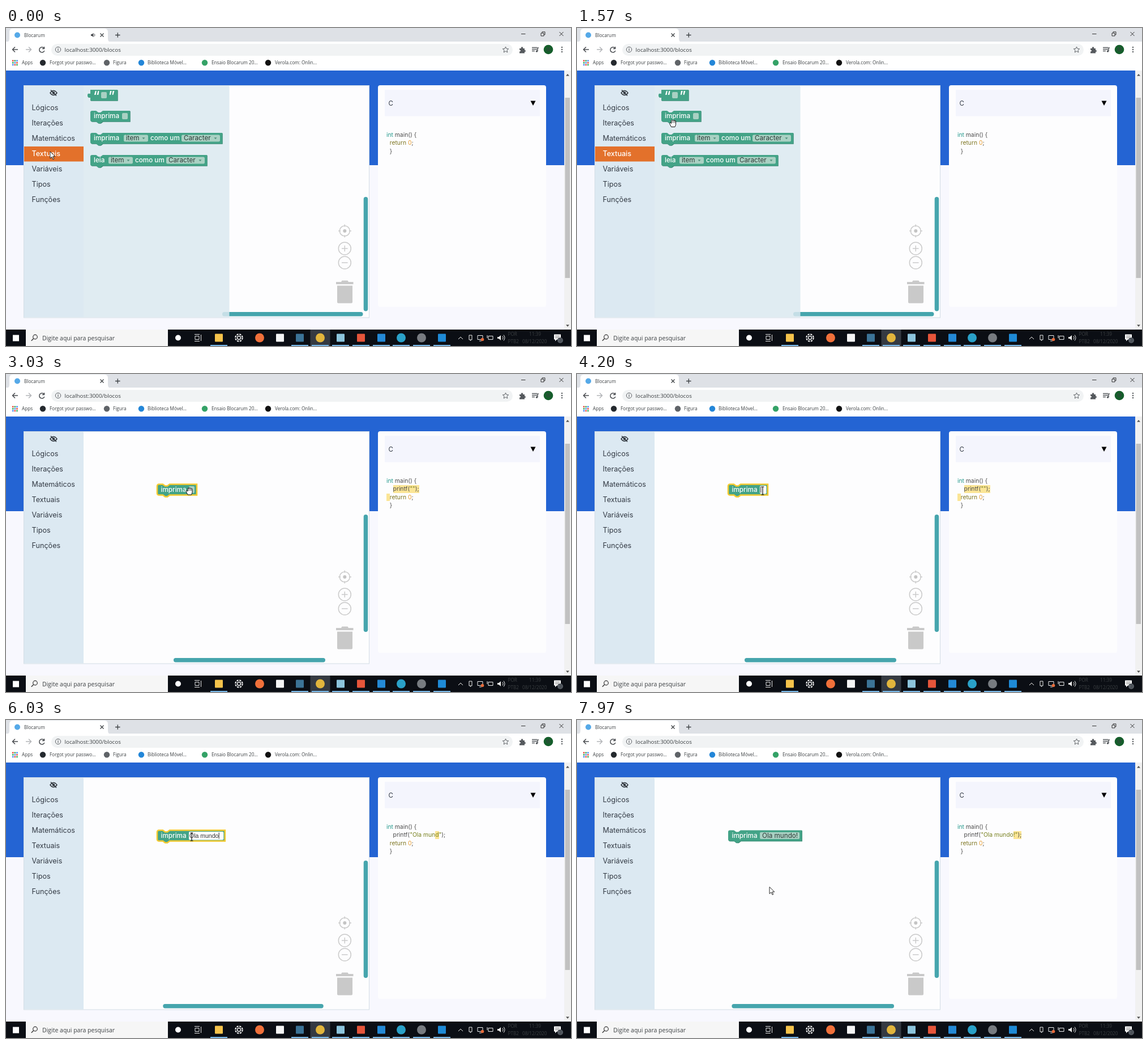
Write an HTML page that moves like this. It is 998 px wide and 561 px high and loops after 8000 ms.

```html
<!DOCTYPE html>
<html lang="pt-BR">
<head>
<meta charset="utf-8">
<title>Blocos</title>
<style>
html, body { margin: 0; width: 100%; height: 100%; overflow: hidden; background: #f8f8fe; }
svg { position: absolute; inset: 0; width: 100%; height: 100%; display: block; }
text { white-space: pre; }
.ui { font-family: "Open Sans", "Noto Sans", sans-serif; fill: #3c4043; }
.page { font-family: Inter, sans-serif; font-size: 12.6px; fill: #333a44; }
.block { font-family: Inter, sans-serif; font-size: 11.7px; font-weight: 500; fill: #fff; }
.value { font-family: Inter, sans-serif; font-size: 11.7px; fill: #303b38; }
.input { font-family: "Liberation Sans", Arial, sans-serif; font-size: 10.5px; fill: #333; }
pre { position: absolute; left: 672px; top: 181px; margin: 0; font: 10.3px/14.4px Inter, sans-serif; color: #4b4b4b; }
pre b { font-weight: 400; }
.type { color: #23988c; } .key { color: #7d7520; } .num { color: #e69a2c; } .str { color: #78801f; }
pre i { font-style: normal; background: #fbe596; display: inline-block; line-height: 13.4px; }
</style>
</head>
<body>
<svg id="stage" viewBox="0 0 998 561"></svg>
<pre id="code"></pre>
<script>
const GREEN = '#43a387', TEAL = '#46a5ad', PILL = '#a9d1c3';
const LOOP = 8000, PHRASE = 'Ola mundo!';
const KEY_TIMES = [4560, 4730, 4890, 5030, 5190, 5420, 5580, 5760, 5960, 6300];
const COMMIT_LAG = 130;
const DRAG = [1780, 2860], EDIT = [3960, 7600];

const rect = (x, y, w, h, fill, r = 0, more = '') =>
  `<rect x="${x}" y="${y}" width="${w}" height="${h}" rx="${r}" fill="${fill}" ${more}/>`;
const dot = (x, y, r, fill, more = '') => `<circle cx="${x}" cy="${y}" r="${r}" fill="${fill}" ${more}/>`;
const line = (d, color, w = 1, more = '') =>
  `<path d="${d}" fill="none" stroke="${color}" stroke-width="${w}" ${more}/>`;
const shape = (d, fill, more = '') => `<path d="${d}" fill="${fill}" ${more}/>`;
const text = (x, y, s, cls, size, more = '') =>
  `<text x="${x}" y="${y}" class="${cls}" ${size ? `style="font-size:${size}px"` : ''} ${more}>${s}</text>`;
const group = (id, body, more = '') => `<g id="${id}" ${more}>${body}</g>`;

const statement = w => `M0,3a3 3 0 0 1 3,-3H10l4,3h4l4,-3H${w}V19H22l-4,3h-4l-4,-3H3a3 3 0 0 1-3,-3z`;
const blockBody = d => shape(d, '#2f8069', 'transform="translate(.7 .7)"') + shape(d, GREEN);
const at = (x, y, body) => `<g transform="translate(${x} ${y})">${body}</g>`;
const dropdown = (x, w, label) => rect(x, 3.5, w, 12, PILL, 2.5) + text(x + 4, 13.2, label, 'value')
  + shape(`M${x + w - 10.5},8.2h5l-2.5,3z`, '#51907d');
const readBlock = (y, verb, x, w) => at(149, y, blockBody(statement(w)) + text(6, 13.3, verb, 'block')
  + dropdown(x, 43, 'item') + text(x + 47, 13.3, 'como um', 'block') + dropdown(x + 102, 68, 'Caracter'));

function browser() {
  const bookmarks = [
    [77, 65, '#24292e', 'Forgot your passwo...'], [189, 178, '#5f6368', 'Figura'],
    [250, 239, '#2386d8', 'Biblioteca Móvel...'], [363, 351, '#34a267', 'Ensaio Blocarum 20...'],
    [475, 463, '#111', 'Verola.com: Onlin...']];
  const appColors = ['#e94335', '#34a853', '#4285f4'];
  let s = rect(0, 0, 998, 25, '#dee1e6') + rect(0, 24, 998, 51, '#fff')
    + shape('M0,25q6,0 6,-6V7q0,-6 6,-6H174q6,0 6,6V19q0,6 6,6z', '#fff')
    + dot(20, 12.5, 5, '#55a9e8') + text(32, 15.5, 'Blocarum', 'ui', 8.2)
    + line('M166.500,9.500l6,6m0,-6l-6,6M193,12.500h8.500m-4.200,-4.200v8.500', '#3c4043', 1.3)
    + line('M910,10.500h7.500M945,9h5v5h-5zM947,8.800v-2h5v5h-2M977.500,7l7,7m0,-7l-7,7', '#333')
    + rect(80, 28, 815, 21, '#f1f3f4', 10.5)
    + line('M21,38h-9.500m4.500,-4.500l-4.500,4.500l4.500,4.500M67,35.500a4.600 4.600 0 1 0 .8,4.500M67.500,33v3.500h-3.500', '#4a4d51', 1.5)
    + line('M35,38h9.500m-4.500,-4.500l4.500,4.500l-4.500,4.500', '#b4b6b9', 1.5)
    + line('M92,40.500v-3.500m0,-2v1.200', '#5f6368', 1.2) + dot(92, 38, 4.7, 'none', 'stroke="#5f6368"')
    + text(103.5, 41.5, 'localhost:3000/blocos', 'ui', 9.8)
    + line('M882.500,33l1.500,3.500 3.700,.3-2.800,2.500 .9,3.700-3.300,-2-3.300,2 .9,-3.700-2.800,-2.500 3.700,-.3z', '#5f6368')
    + shape('M907,36h3q-.5,-2.800 1.500,-2.800t1.500,2.800h3v3q2,0 2,1.500t-2,1.500v2.500h-9v-3q2,0 2,-1.500t-2,-1.500z', '#55595d')
    + line('M929,34.500h9m-9,3h9m-9,3h5M939,41v-6h2', '#55595d', 1.5) + dot(937.5, 41, 1.8, '#55595d')
    + dot(958, 38, 8.3, '#155e2b') + text(958, 41, 'M', 'ui', 8.5, 'text-anchor="middle" fill="#fff" style="fill:#fff;font-size:8.5px"')
    + [34, 38, 42].map(y => dot(982, y, 1.2, '#55595d')).join('');
  for (let i = 0; i < 9; i++) s += rect(11 + i % 3 * 3.6, 56.5 + (i / 3 | 0) * 3.6, 2.5, 2.5, appColors[(i + (i / 3 | 0)) % 3]);
  s += text(28, 64.3, 'Apps', 'ui', 8.2);
  for (const [x, icon, color, label] of bookmarks) s += dot(icon, 61.3, 5.2, color) + text(x, 64.3, label, 'ui', 8.2);
  return s + group('audio', shape('M150,11h2l2.500,-2.300v7.600l-2.500,-2.300h-2z', '#4a4d51')
    + line('M156,10.300q2,2.200 0,4.400', '#4a4d51'));
}

function page() {
  const labels = ['Lógicos', 'Iterações', 'Matemáticos', 'Textuais', 'Variáveis', 'Tipos', 'Funções'];
  return rect(0, 75, 998, 457, '#f8f8fe') + rect(0, 75, 986, 167, '#2464d3')
    + rect(986, 75, 12, 457, '#f1f1f1') + rect(987.5, 123, 8.5, 318, '#c1c1c1')
    + shape('M989,84.500h6l-3,-3.500zM989,523.500h6l-3,3.500z', '#505050')
    + rect(31.5, 101.5, 610, 409.500, '#fdfdfe', 0, 'stroke="#d3dde5"')
    + rect(657, 101, 297, 391, '#fdfdfe', 4) + rect(669, 109, 274, 46.500, '#f4f5fd')
    + text(675.5, 136.5, 'C', 'page', 11.5) + shape('M926.500,128.500h9l-4.500,8.500z', '#000')
    + rect(0, 504.5, 0, 7.5, TEAL, 3.7, 'id="barX" transform="translate(0 -3.500)"')
    + rect(631.700, 0, 7.5, 0, TEAL, 3.7, 'id="barY"')
    + [[358, 9], [389, 11], [414, 11]].map(([y, r]) => dot(598.3, y, r, 'none', 'stroke="#cbcbcb" stroke-width="1.500"')).join('')
    + dot(598.3, 358, 3, '#c4c4c4')
    + line('M598.300,346.500v4m0,15v4M587,358h4m15,0h4M593,389h10.600m-5.300,-5.300v10.600M593,414h10.600', '#cbcbcb', 1.5)
    + shape('M583,448h9l1.500,-2.500h10l1.500,2.500h8.500v4h-30.500zM585,454.500h27v29q0,2 -2,2h-23q-2,0 -2,-2z', '#c9c9c9')
    + rect(32, 102, 105, 408.500, '#dce9f2')
    + rect(32, 209, 105, 26.500, '#e3712b', 0, 'id="selected"')
    + line('M78,114.500q6,-8 12,0q-6,8 -12,0zM79,109.500l10,10', '#30363d', 1.500) + dot(84, 114.500, 2.300, '#30363d')
    + labels.map((s, i) => text(45.5, 145 + i * 27, s, 'page', 0, i === 3 ? 'id="chosen"' : '')).join('');
}

function flyout() {
  const quote = 'M3,0H51V19H3V14c0,-3 -5,2 -5,-4s5,-1 5,-4z';
  return group('flyout', rect(137, 102, 257.500, 408.500, '#dbe9f0', 0, 'opacity=".85"')
    + at(146, 109, blockBody(quote) + rect(22, 4, 10, 11, PILL, 2)
      + text(8, 20, '“', 'block', 24) + text(35, 20, '”', 'block', 24))
    + at(149, 146, blockBody(statement(70)) + text(6, 13.3, 'imprima', 'block') + rect(56, 4, 10, 11, PILL, 2))
    + readBlock(185, 'imprima', 59, 233) + readBlock(224, 'leia', 32, 206));
}

function taskbar() {
  const apps = [[376, '#f5c34b', 1], [448, '#f0703a', 0], [484, '#f4f4f4', 0], [519, '#3c7396', 1], [555, '#e2b53c', 1],
    [591, '#8cc4dc', 1], [627, '#e6553a', 1], [663, '#2489d5', 1], [698, '#2aa1c8', 1], [734, '#777b80', 1], [770, '#1e8ad6', 1]];
  const square = [376, 484, 519, 591, 627, 663, 770];
  let s = rect(0, 532, 998, 29, '#0b0e14') + rect(35, 532, 251, 29, '#f6f6f6')
    + rect(12, 541.5, 11, 11, '#fff') + dot(51.5, 545, 3.8, 'none', 'stroke="#333" stroke-width="1.200"')
    + line('M48.800,547.800l-4,4', '#333', 1.3) + text(64, 550.5, 'Digite aqui para pesquisar', 'ui', 10.5)
    + dot(304, 546.5, 5, '#fff')
    + line('M334,543.500h7v6h-7zM333,540.500h9M333,552.500h9M344.500,541v11', '#e8e8e8')
    + rect(537.5, 532, 35, 29, '#353a42')
    + dot(411.5, 546.5, 6.2, 'none', 'stroke="#eee" stroke-width="2.200" stroke-dasharray="3.200 1.670"')
    + dot(411.5, 546.5, 3, 'none', 'stroke="#eee" stroke-width="1.500"');
  for (const [x, color, open] of apps) {
    s += square.includes(x) ? rect(x - 7, 539.5, 14, 14, color, 1) : dot(x, 546.5, 8, color);
    if (open) s += rect(x - 15, 559, 30, 2, '#77b7e8');
  }
  const tray = (x, y, label) => text(x, y, label, 'ui', 8.2, 'style="fill:#fff;font-size:8.2px"');
  return s + line('M799,549l4,-4 4,4M818,542h5v8h-5zM820.500,552v-2M833,542.500h9v7h-9zM836,552h4M852,543.500h8v6h-8zM850,542v5M877,543.500q2.500,3 0,6M879,541.500q4,5 0,10', '#eee')
    + dot(841.5, 549.5, 2.800, '#e86b3a') + shape('M868,545h2.500l3.500,-3v9l-3.500,-3h-2.500z', '#eee')
    + tray(886.5, 543, 'POR') + tray(886.5, 555.5, 'PTB2') + tray(924, 543, '11:39') + tray(912, 555.5, '08/12/2020')
    + shape('M968,540.500h12v9h-7l-3,3v-3h-2z', '#fff') + line('M970,543.500h8m-8,3h8', '#444', .8)
    + dot(979, 551, 5, '#555b63') + tray(976.8, 554, '3');
}

const cursors = group('arrow', shape('M0,0V12l3,-2.600 2,4.400 1.800,-.8-2,-4.300h4z', '#fff', 'stroke="#111" stroke-width=".9"'))
  + group('open', shape('M-3,7l-3,-6q0,-2 2,-1l1,1V-4q1,-2 2,0q1,-3 2.300,0q1.500,-2 2,.5q1.700,-1 1.700,1V3l-1.500,4z', '#fff', 'stroke="#111" stroke-width="1"')
    + line('M-1,-4V0M1.300,-4V0M3.300,-3V0', '#111', .7))
  + group('closed', shape('M-3,4l-2,-4q0,-2 2,-1.500q0,-2.500 2,-2q1.500,-1 2.500,0q2,-.5 2,.7q1.500,0 1.500,2l-1.200,4.800z', '#fff', 'stroke="#111" stroke-width="1"'))
  + group('beam', line('M-2.500,-7h2l.5,.5 .5,-.5h2M0,-6.500V6.500M-2.500,7h2l.5,-.5 .5,.5h2', '#111', 1.2));

const movingBlock = group('block', `<path id="shade" fill="#2f8069" transform="translate(.7 .7)"/><path id="outline" fill="${GREEN}" stroke-width="2.600"/>`
  + text(6.5, 13.3, 'imprima', 'block') + '<rect id="field" rx="2"/>' + text(0, 0, '', 'value', 0, 'id="fieldText"')
  + line('', '#222', 1, 'id="caret"'));

document.getElementById('stage').innerHTML = browser() + page() + flyout() + movingBlock + taskbar() + group('cursor', cursors);

const $ = id => document.getElementById(id);
const set = (id, attrs) => { for (const k in attrs) $(id).setAttribute(k, attrs[k]); };
const show = (id, on) => { $(id).style.display = on ? '' : 'none'; };
const pen = document.createElement('canvas').getContext('2d');
const widthOf = (s, font) => { pen.font = font; return pen.measureText(s).width; };

// Rows are [time, x, y]; each leg eases in and out.
function follow(path, t) {
  let i = path.findIndex(p => p[0] > t);
  if (i < 0) i = path.length;
  if (i === 0 || i === path.length) return path[Math.max(0, i - 1)].slice(1);
  const [a, b] = [path[i - 1], path[i]], u = (t - a[0]) / (b[0] - a[0]), e = u * u * (3 - 2 * u);
  return [a[1] + (b[1] - a[1]) * e, a[2] + (b[2] - a[2]) * e];
}
const cursorPath = [[0, 78, 218], [250, 79, 218], [670, 146, 185], [1150, 168, 166], [1780, 170, 168], [2070, 210, 186],
  [2500, 228, 195], [2860, 288, 216], [3020, 324, 206], [3600, 324, 206], [3850, 328, 206], [7000, 328, 206], [7450, 340, 294.500]];
const blockPath = [[1780, 149, 146], [2070, 189, 164], [2500, 207, 173], [2860, 267, 194.500]];

let lastCode;
function drawCode(t, committed) {
  const n = committed.length, fresh = n === 0, done = n === PHRASE.length;
  let call = '';
  if (t >= 1900) {
    const body = fresh ? '<i>printf(<b class="str">""</b>);</i>'
      : `printf(<b class="str">"${committed.slice(0, -1)}</b>`
        + (done ? '<i><b class="str">!"</b>);</i>' : `<i><b class="str">${committed.slice(-1)}</b></i><b class="str">"</b>);`);
    call = `    ${body}\n`;
  }
  const indent = call && fresh ? '<i>  </i>' : '  ';
  const html = `<b class="type">int</b> main() {\n${call}${indent}<b class="key">return</b> <b class="num">0</b>;\n  }`;
  if (html !== lastCode) $('code').innerHTML = lastCode = html;
}

function draw(t) {
  const count = time => KEY_TIMES.filter(k => k <= time).length;
  const typed = PHRASE.slice(0, count(t)), committed = PHRASE.slice(0, count(t - COMMIT_LAG));
  const placed = t >= DRAG[0], dragging = placed && t < DRAG[1], editing = t >= EDIT[0] && t < EDIT[1];

  show('audio', t < 1500);
  show('flyout', !placed);
  show('selected', !placed);
  $('chosen').style.fill = placed ? '' : '#fff';
  $('chosen').style.fontWeight = placed ? 400 : 500;
  drawCode(t, committed);

  const [bx, by] = follow(blockPath, t);
  const width = committed ? 67 + widthOf(committed, '11.7px Inter, sans-serif') : 70;
  const path = statement(width), grow = width - 70;
  show('block', placed);
  set('block', { transform: `translate(${bx} ${by})`, opacity: dragging ? .85 : 1 });
  set('shade', { d: path });
  set('outline', { d: path, stroke: t < EDIT[1] ? '#f7cb30' : 'none' });
  set('field', editing ? { x: 56, y: 2.5, width: width - 58.500, height: 14.500, fill: '#fff' }
    : { x: 56, y: 3.5, width: width - 60, height: 12, fill: PILL });
  $('fieldText').textContent = editing ? typed : committed;
  set('fieldText', editing ? { x: 57, y: 13.200, class: 'input' } : { x: 60, y: 13.200, class: 'value' });
  const since = t - (KEY_TIMES[typed.length - 1] || EDIT[0]);
  const caretX = 57.8 + widthOf(typed, '10.5px "Liberation Sans", Arial, sans-serif');
  show('caret', editing && since % 1000 < 500);
  set('caret', { d: `M${caretX},4v11` });

  const left = placed ? 359 - .808 * (bx - 189) - .375 * grow : 382;
  const right = placed ? 627 - .808 * (bx - 189) - .065 * grow : 630.500;
  const top = placed ? 273 - .82 * (by - 164) : 298;
  set('barX', { x: left, width: right - left });
  set('barY', { y: top, height: placed ? 207 : 201.500 });

  const [cx, cy] = follow(cursorPath, t);
  const kind = t < 850 ? 'arrow' : dragging ? 'closed' : t < EDIT[0] ? 'open' : t < 7080 ? 'beam' : 'arrow';
  set('cursor', { transform: `translate(${cx} ${cy})` });
  for (const id of ['arrow', 'open', 'closed', 'beam']) show(id, id === kind);
}

const start = performance.now();
function tick() {
  draw((performance.now() - start) % LOOP);
  requestAnimationFrame(tick);
}
tick();
</script>
</body>
</html>
```
